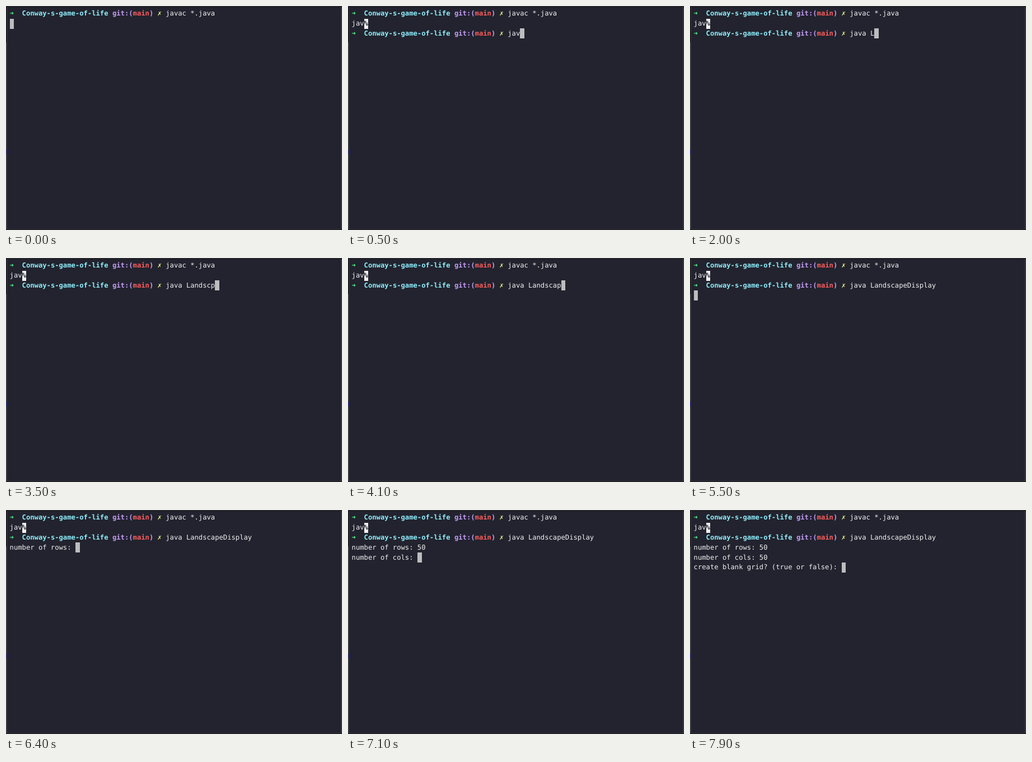
Recreate the animation shown at these times as an HTML page. Size 600 by 401 pixels, loop 8 s.

```html
<!DOCTYPE html>
<html lang="en">
<head>
<meta charset="utf-8">
<title>Terminal session</title>
<style>
  html, body { margin: 0; width: 100%; height: 100%; overflow: hidden; background: #22232e; }
  #stage {
    position: relative; width: 600px; height: 401px; overflow: hidden;
    background: #22232e; color: #f0f0f2;
    font: 12.18px/17.8px "DejaVu Sans Mono", monospace;
    text-rendering: geometricPrecision;
  }
  #stage span, #stage i { position: absolute; white-space: pre; }
  .green { color: #50f58a; }
  .cyan { color: #8eeefd; }
  .purple { color: #c49cf6; }
  .red { color: #fa5c5c; }
  .yellow { color: #f3f78f; }
  .bold { font-weight: bold; }
  #mark { color: #22232e; background: #f0f0f1; width: 7.6px; height: 18px; }
  #cursor { background: #bdbdbf; width: 7.8px; height: 18px; margin-top: -0.7px; }
  .top { left: 0; top: 0; width: 600px; height: 1px; background: #35363e; border-bottom: 1px solid #17171c; }
  .left { left: 0; top: 2px; width: 1px; height: 399px; background: #41424a; border-right: 1px solid #3b3c45; }
  .shade { left: 0; top: 2px; width: 1px; height: 63px; background: #0c0c10; }
  .dot { left: 0; top: 257px; width: 1px; height: 8px; background: #22228c; }
  .right { left: 598px; top: 2px; width: 2px; height: 398px; background: #393a44; }
  .bottom { left: 0; top: 399px; width: 600px; height: 1px; background: #33343c; border-bottom: 1px solid #17171c; }
</style>
</head>
<body>
<div id="stage">
  <i class="left"></i><i class="shade"></i><i class="dot"></i>
  <i class="right"></i><i class="top"></i><i class="bottom"></i>
</div>
<script>
const LOOP = 8000, CELL = 7.333, LINE = 17.8, X0 = 6.6, Y0 = 5.4;
const INPUT_COL = 38;
const stage = document.getElementById('stage');

function place(el, row, col) {
  el.style.left = X0 + col * CELL + 'px';
  el.style.top = Y0 + row * LINE + 'px';
}

function put(row, col, text, cls = '') {
  const el = document.createElement('span');
  el.className = cls;
  el.textContent = text;
  place(el, row, col);
  stage.append(el);
  return el;
}

function prompt(row) {
  return [
    put(row, 0, '➜', 'green bold'),
    put(row, 3, 'Conway-s-game-of-life', 'cyan bold'),
    put(row, 25, 'git:(', 'purple bold'),
    put(row, 30, 'main', 'red bold'),
    put(row, 34, ')', 'purple bold'),
    put(row, 36, '✗', 'yellow bold')
  ];
}

prompt(0);
put(0, INPUT_COL, 'javac *.java');

const cursor = put(1, 0, '');
cursor.id = 'cursor';
const lines = [1, 2, 3, 4, 5].map(row => put(row, row === 2 ? INPUT_COL : 0, ''));
const mark = put(1, 3, '%', 'bold');
mark.id = 'mark';
const second = [mark, ...prompt(2)];

// [time, row, text so far]; the cursor follows the text
const steps = [
  [0, 1, ''], [100, 1, 'j'], [200, 1, 'ja'], [300, 1, 'jav'],
  [400, 2, ''], [500, 2, 'jav'],
  [1400, 2, 'java'], [1600, 2, 'java '], [1800, 2, 'java L'],
  [2200, 2, 'java La'], [2400, 2, 'java Lan'], [2700, 2, 'java Land'],
  [3200, 2, 'java Lands'], [3300, 2, 'java Landsc'],
  [3500, 2, 'java Landscp'], [3600, 2, 'java Landscpe'],
  [3800, 2, 'java Landscp'], [3900, 2, 'java Landsc'],
  [4000, 2, 'java Landsca'], [4100, 2, 'java Landscap'], [4200, 2, 'java Landscape'],
  [4400, 2, 'java LandscapeD'], [4600, 2, 'java LandscapeDi'],
  [4700, 2, 'java LandscapeDis'], [4800, 2, 'java LandscapeDisp'],
  [4900, 2, 'java LandscapeDispl'], [5000, 2, 'java LandscapeDispla'],
  [5200, 2, 'java LandscapeDisplay'],
  [5500, 3, ''], [5900, 3, 'number of rows: '],
  [6700, 3, 'number of rows: 5'], [6900, 3, 'number of rows: 50'],
  [7100, 4, 'number of cols: '],
  [7300, 4, 'number of cols: 5'], [7500, 4, 'number of cols: 50'],
  [7600, 5, 'create blank grid? (true or false): ']
];

let shown = -1;

function render(t) {
  const now = steps.findLastIndex(s => s[0] <= t);
  if (now === shown) return;
  shown = now;
  const past = steps.slice(0, now + 1);
  const [, row, text] = past[now];
  lines.forEach((el, i) => {
    const last = past.findLast(s => s[1] === i + 1);
    el.textContent = last ? last[2] : '';
  });
  second.forEach(el => { el.style.visibility = row > 1 ? 'visible' : 'hidden'; });
  place(cursor, row, text.length + (row === 2 ? INPUT_COL : 0));
}

const start = performance.now();
function tick() {
  render((performance.now() - start) % LOOP);
  requestAnimationFrame(tick);
}
tick();
</script>
</body>
</html>
```
